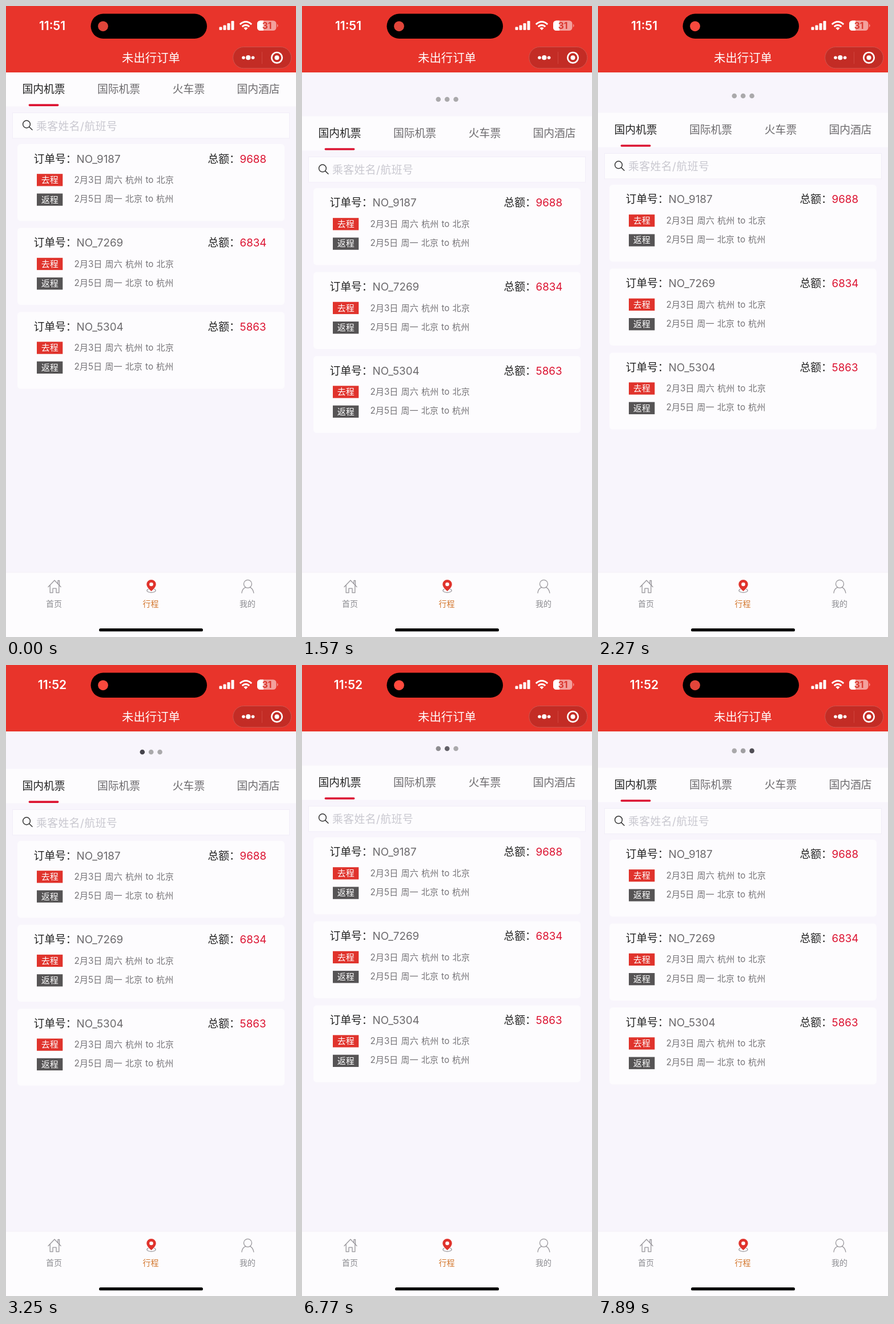
Recreate the animation shown at these times as an HTML page. Size 508 by 1102 pixels, loop 7.99 s.

```html
<!DOCTYPE html>
<html lang="zh-CN">
<head>
<meta charset="utf-8">
<title>未出行订单</title>
<style>
  html, body { margin: 0; height: 100%; overflow: hidden; background: #f8f5fc; }
  svg { display: block; width: 100%; height: 100%; }
  text { font: 400 18.8px Inter, "Noto Sans CJK SC", "Noto Sans CJK", sans-serif; fill: #222; }
  .mid { text-anchor: middle; }
  .label { font-weight: 500; }
  .gray { fill: #6c6a6d; }
  .amount { fill: #dc1432; }
  .leg { font-size: 15.2px; fill: #757377; word-spacing: .8px; }
  .tag { font-size: 15px; font-weight: 500; fill: #fff; }
  .nav { font-size: 14px; fill: #8b8b90; }
  .panel { fill: #fdfcfe; }
  .icon { fill: none; stroke: #98969b; stroke-width: 1.3; stroke-linejoin: round; stroke-linecap: round; }
</style>
</head>
<body>
<svg viewBox="0 0 508 1102">
  <rect width="508" height="1102" fill="#f8f5fc"/>

  <g id="page">
    <g id="loader"></g>
    <rect class="panel" y="115.5" width="508" height="60"/>
    <g id="tabs"></g>
    <rect x="39.5" y="171.3" width="53" height="3.6" rx="1.8" fill="#dc1432"/>
    <rect class="panel" x="11.5" y="186.5" width="485" height="44.5" stroke="#f1edf8"/>
    <g fill="none" stroke="#333" stroke-width="1.5" stroke-linecap="round">
      <circle cx="36" cy="206.5" r="6.4"/>
      <path d="M40.7 211.2L46 216.3"/>
    </g>
    <text x="53" y="216.5" style="fill:#c9c8d0;letter-spacing:.5px">乘客姓名/航班号</text>
    <g id="cards"></g>
  </g>

  <g id="header">
    <rect width="508" height="116" fill="#e8342b"/>
    <text id="clock" class="mid" x="81" y="42.2" style="font-size:21px;font-weight:600;fill:#fff"></text>
    <rect x="148.5" y="13.5" width="203.5" height="43.5" rx="21.7"/>
    <circle id="recording" cx="170" cy="35.3" r="8.9"/>
    <g fill="#fff">
      <rect x="373.5" y="36.5" width="5" height="5.5" rx="1.3"/>
      <rect x="380.5" y="33.5" width="5" height="8.5" rx="1.3"/>
      <rect x="387.5" y="30" width="5" height="12" rx="1.3"/>
      <rect x="394.5" y="26" width="5" height="16" rx="1.3"/>
      <path d="M420 42.3l-3.6-3.7q3.6-2.8 7.2 0z"/>
    </g>
    <g fill="none" stroke="#fff" stroke-width="3">
      <path d="M409.8 32.1q10.2-9.2 20.4 0"/>
      <path d="M413.7 36.1q6.3-5.4 12.6 0"/>
    </g>
    <rect x="440" y="25.5" width="33.5" height="17.5" rx="5.5" fill="#f3a09c"/>
    <path d="M451 25.5h-5.5a5.5 5.5 0 0 0-5.5 5.5v6.5a5.5 5.5 0 0 0 5.5 5.5h5.5z" fill="#fff"/>
    <path d="M475 31.2q3.2 3 0 6z" fill="#f3a09c"/>
    <text class="mid" x="457" y="40" style="font-size:15.5px;font-weight:700;fill:#d9372f">31</text>
    <text class="mid" x="254" y="98.3" style="font-size:20.4px;font-weight:500;fill:#fff">未出行订单</text>
    <rect x="397.7" y="71.5" width="102" height="37.3" rx="18.6" fill="#c32c25" stroke="#d0554e"/>
    <path d="M448.5 80v21" stroke="#d0453d"/>
    <g fill="#fff">
      <circle cx="416" cy="90.2" r="2.8"/>
      <circle cx="424.3" cy="90.2" r="4.1"/>
      <circle cx="432.6" cy="90.2" r="2.8"/>
      <circle cx="474.5" cy="90.2" r="4"/>
      <circle cx="474.5" cy="90.2" r="9.2" fill="none" stroke="#fff" stroke-width="2.7"/>
    </g>
  </g>

  <g id="footer">
    <rect class="panel" y="989" width="508" height="113"/>
    <path d="M0 989h508" stroke="#f3f0f7"/>
    <g class="icon">
      <path d="M74 1014.5L85 1003l11 11.5M91 1009v-5.5h2.5v8M77.2 1012v12.7h4.8v-7.5h6v7.5h4.8V1012"/>
      <circle cx="423.5" cy="1009.3" r="7"/>
      <path d="M413 1025q1.2-8.2 7-9.6M427.5 1015.4q5 2 6.4 9.6"/>
      <path d="M249 1018.5q-4 2.3-.5 4.5q6 2.6 12 0q3.5-2.2-.5-4.5"/>
    </g>
    <path d="M254.5 1022q-8.2-6.8-8.2-12a8.2 8 0 0 1 16.4 0q0 5.2-8.2 12z" fill="#e0332c"/>
    <circle cx="254.5" cy="1010" r="3.3" fill="#fff"/>
    <text class="nav mid" x="84" y="1049">首页</text>
    <text class="nav mid" x="253.5" y="1049" style="fill:#d3762d">行程</text>
    <text class="nav mid" x="423" y="1049">我的</text>
    <rect x="163" y="1087" width="182" height="5.3" rx="2.65"/>
  </g>
</svg>

<script>
const byId = id => document.getElementById(id);
const LOOP = 7990;
const CLOCK_TICK = 2750;
const DOT_STEP = 947;

// Pull to refresh: drag, spring back to the loading height, close, drag again
const DRAG_HEIGHT = 110, DRAG_TIME = 850;
const LOADING_HEIGHT = 66, SPRING_TIME = 170, CLOSE_TIME = 300;
const FIRST_DRAG = 1030, RELEASE = 1900, DOTS_START = 2350, CLOSE = 6715, SECOND_DRAG = 7420;

byId('tabs').innerHTML = [['国内机票', 66], ['国际机票', 197.5], ['火车票', 320], ['国内酒店', 442]]
  .map(([name, x], i) => `<text class="mid ${i ? 'gray' : 'label'}" x="${x}" y="152">${name}</text>`)
  .join('');

const leg = (y, color, tag, route, textY) => `
  <rect x="54" y="${y}" width="45.3" height="21.3" fill="${color}"/>
  <text class="tag mid" x="76.7" y="${y + 16}">${tag}</text>
  <text class="leg" x="119.5" y="${textY}">${route}</text>`;

const card = ([order, total], i) => `<g transform="translate(0 ${241 + i * 146.6})">
  <rect class="panel" x="20" width="468" height="134.5" rx="6"/>
  <text class="label" x="48.5" y="32.5">订单号：</text>
  <text class="gray" x="123.5" y="32.5">NO_${order}</text>
  <text class="label" x="353.5" y="32.5">总额：</text>
  <text class="amount" x="409.5" y="32.5">${total}</text>
  ${leg(52.2, '#e0332c', '去程', '2月3日 周六 杭州 to 北京', 68)}
  ${leg(86.5, '#565455', '返程', '2月5日 周一 北京 to 杭州', 101.2)}
</g>`;
byId('cards').innerHTML = [[9187, 9688], [7269, 6834], [5304, 5863]].map(card).join('');

byId('loader').innerHTML = [238.8, 254.2, 269.6]
  .map(x => `<circle cx="${x}" cy="86" r="4.3"/>`).join('');
const dots = [...byId('loader').children];

const clamp = k => Math.min(1, Math.max(0, k));
const ease = k => clamp(k) ** 2 * (3 - 2 * clamp(k));
const mix = (a, b, k) => `rgb(${a.map((v, i) => Math.round(v + (b[i] - v) * k))})`;

function pullAt(t) {
  const drag = from => DRAG_HEIGHT * ease((t - from) / DRAG_TIME);
  if (t < RELEASE) return drag(FIRST_DRAG);
  if (t >= SECOND_DRAG) return drag(SECOND_DRAG);
  const spring = (DRAG_HEIGHT - LOADING_HEIGHT) * Math.exp((RELEASE - t) / SPRING_TIME);
  return (LOADING_HEIGHT + spring) * (1 - ease((t - CLOSE) / CLOSE_TIME));
}

function draw(t) {
  byId('page').setAttribute('transform', `translate(0 ${pullAt(t).toFixed(2)})`);
  byId('clock').textContent = t < CLOCK_TICK ? '11:51' : '11:52';

  const glow = (1 + Math.cos((t - 2760) / 4000 * 2 * Math.PI)) / 2;
  byId('recording').setAttribute('fill', mix([208, 66, 56], [255, 74, 62], glow));

  const fade = clamp((t - DOTS_START) / 200);
  const position = ((t - 3250) / DOT_STEP + 6) % 3;
  dots.forEach((dot, i) => {
    const gap = Math.abs(position - i);
    const dark = clamp(1 - Math.min(gap, 3 - gap)) * fade;
    dot.setAttribute('fill', mix([170, 169, 171], [70, 68, 76], dark));
  });
}

const start = performance.now();
function frame() {
  draw((performance.now() - start) % LOOP);
  requestAnimationFrame(frame);
}
frame();
</script>
</body>
</html>
```
